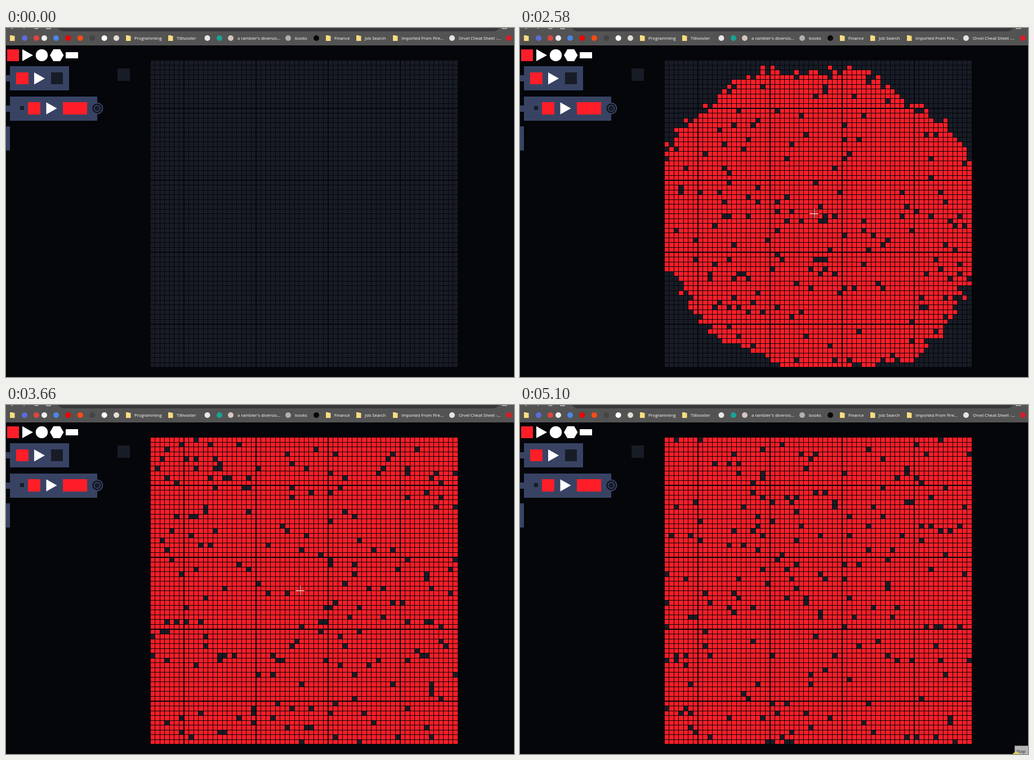
Write an HTML page with a canvas that moves like this. It is 902 px wide and 621 px high and loops after 5150 ms.

```html
<!DOCTYPE html>
<html lang="en">
<head>
<meta charset="utf-8">
<title>Growing colony</title>
<style>
html, body { margin: 0; width: 100%; height: 100%; overflow: hidden; background: #04060a; }
canvas, svg { position: absolute; left: 0; top: 0; }
text { font: 7.65px "Open Sans", "Noto Sans", sans-serif; fill: #fff; }
</style>
</head>
<body>
<canvas id="stage" width="902" height="621"></canvas>
<svg width="902" height="621" viewBox="0 0 902 621">
  <defs>
    <path id="folder" d="M0 0h4.5l1 1h3v9h-8.5z" fill="#f9dc82"/>
    <path id="play" d="M0 0L19 10.7L0 21.4z" fill="#fff"/>
  </defs>
  <rect width="902" height="31" fill="#535353"/>
  <rect x="91" y="-20" width="786" height="26" rx="12" fill="#37383a"/>
  <path d="M9 0l3 1.5M31 0l2 1M50 0q4 3 8 0M72 0v1.5h7V0M881 0v1h8V0" fill="none" stroke="#eee"/>
  <g id="bookmarks"></g>

  <g shape-rendering="crispEdges">
    <path d="M7 68h105v43H7zM0 84h7v11H0zM7 122h155v43H7zM0 138h7v11H0zM0 175h7v43H0z" fill="#384364"/>
    <path d="M2 38h21v21H2zM18 79h22v21H18zM39 132h22v22H39zM101 132h43v22h-43z" fill="#ff1e28"/>
    <path d="M80 79h21v21H80zM25 139h7v7h-7zM198 72h22v22h-22z" fill="#181c26"/>
    <path d="M106 43h22v11h-22z" fill="#fff"/>
  </g>
  <use href="#play" x="29" y="37.7"/>
  <use href="#play" x="50" y="79"/>
  <use href="#play" x="71.5" y="132.3"/>
  <circle cx="63.5" cy="48.4" r="10.7" fill="#fff"/>
  <path d="M78 48.4l6.2-10.7h12l6.2 10.7l-6.2 10.7h-12z" fill="#fff"/>
  <circle cx="161.8" cy="143" r="10.6" fill="#384364"/>
  <circle cx="161.8" cy="143" r="7.4" fill="#384364" stroke="#0a0d15" stroke-width="2"/>
  <circle cx="161.8" cy="143" r="4.5" fill="#181c26"/>

  <g id="stop" visibility="hidden">
    <rect x="878.5" y="606.5" width="30" height="20" fill="#b4b4b4" stroke="#777"/>
    <text x="881.5" y="619" style="fill:#222">Stop</text>
    <circle cx="881" cy="624.5" r="7" fill="#e8d24c"/>
  </g>
</svg>
<script>
const LOOP = 5150, TICK = 47.5, SIZE = 64;
const LEFT = 256.83, TOP = 58.2, SCALE = 16 / 15, PITCH = 8 * SCALE, CELL = 7 * SCALE;
const RED = '#ff1e28', DARK = '#181c26';
const ctx = document.getElementById('stage').getContext('2d');
const stop = document.getElementById('stop');

// Bookmarks: text position, label, icon colour (a folder if there is none)
const bookmarks = [
  [22, ''], [45, '', '#5b6be0'], [66, '', '#e0453a'], [80, '', '#f0f0f0'],
  ...['#4a86e8', '#f00000', '#ff4a16', '#444', '#fff', '#e4dcd6'].map((c, i) => [101 + i * 21.4, '', c]),
  [228, 'Programming'], [303, 'Tillivoxter'], [369.5, '', '#e8e8e8'], [391, '', '#18a394'],
  [411, "a rambler's diversio...", '#d8c4c0'], [513, 'books', '#b0b0b0'], [563, '', '#080808'],
  [583, 'Finance'], [637, 'Job Search'], [702, 'Imported From Fire...'],
  [804, 'Orvel Cheat Sheet -...', '#e4e4e4'], [905, '', '#d81c28']
];
document.getElementById('bookmarks').innerHTML = bookmarks.map(([x, label, colour]) =>
  (colour ? `<circle cx="${x - 12}" cy="18" r="5" fill="${colour}"/>` : `<use href="#folder" x="${x - 15}" y="13"/>`) +
  `<text x="${x}" y="20.8">${label}</text>`).join('');

function hash(a, b, c) {
  let h = Math.imul(a + 11, 374761393) ^ Math.imul(b + 7, 668265263) ^ Math.imul(c + 3, 1274126177);
  h = Math.imul(h ^ h >>> 15, 2246822519);
  h = Math.imul(h ^ h >>> 13, 3266489917);
  return ((h ^ h >>> 16) >>> 0) / 4294967296;
}

// The colony spreads from the middle, slowly at first, with a lopsided, ragged rim.
function birth(col, row) {
  const dx = col - 29, dy = row - 32, angle = Math.atan2(dy, dx);
  const rim = 32.8 + 2.8 * Math.cos(angle - .3) + 1.8 * Math.cos(2 * angle - .7) + .8 * Math.sin(9 * angle);
  const reach = Math.hypot(dx, dy) / rim + (hash(col, row, 0) - .5) * .07;
  return reach < .15 ? 1890 + 310 * Math.max(0, reach) / .15 : 2200 + (reach - .15) * 447;
}

function span(origin, i) {
  const from = Math.round(origin + i * PITCH);
  return [from, Math.round(origin + i * PITCH + CELL) - from];
}

const cells = Array.from({ length: SIZE * SIZE }, (_, i) => {
  const col = i % SIZE, row = Math.floor(i / SIZE);
  const [x, w] = span(LEFT, col), [y, h] = span(TOP, row);
  return { col, row, x, y, w, h, born: birth(col, row) };
});

// Pointer moves: start, end, and where it goes
const moves = [
  [160, 620, 367, 163], [750, 1000, 586, 250], [1000, 1260, 512, 323], [1310, 1460, 526, 338],
  [1640, 1740, 522, 330], [3720, 4040, 867, 505], [4040, 4140, 874, 515], [4140, 4500, 890, 630]
];
const arrow = new Path2D('M0 0V10.5L2.5 8.3L4 12L5.7 11.3L4.2 7.8H7.5Z');

function pointerAt(t) {
  let x = 863, y = 630;
  for (const [from, to, tx, ty] of moves) {
    const k = Math.min(1, Math.max(0, (t - from) / (to - from)));
    const ease = (1 - Math.cos(Math.PI * k)) / 2;
    x += (tx - x) * ease;
    y += (ty - y) * ease;
  }
  return [Math.round(x), Math.round(y)];
}

function drawPointer(t) {
  const [x, y] = pointerAt(t);
  const overGrid = x > 257 && x < 802 && y > 58 && y < 603;
  ctx.save();
  ctx.translate(x, y);
  ctx.fillStyle = '#fff';
  if (overGrid) {
    ctx.globalCompositeOperation = 'difference';
    ctx.fillRect(-8, 0, 16, 1);
    ctx.fillRect(0, -8, 1, 8);
    ctx.fillRect(0, 1, 1, 7);
  } else {
    ctx.fill(arrow);
  }
  ctx.restore();
}

function draw(time) {
  const tick = Math.floor((time - 2200) / TICK + 1e-6), t = 2200 + tick * TICK;
  ctx.fillStyle = '#04060a';
  ctx.fillRect(0, 0, 902, 621);
  for (const c of cells) {
    const alive = t >= c.born && hash(c.col, c.row, tick + 100) > .05;
    ctx.fillStyle = alive ? RED : DARK;
    ctx.fillRect(c.x, c.y, c.w, c.h);
  }
  drawPointer(t);
  stop.setAttribute('visibility', time >= 5050 ? 'visible' : 'hidden');
}

const start = performance.now();
function loop() {
  draw((performance.now() - start) % LOOP);
  requestAnimationFrame(loop);
}
loop();
</script>
</body>
</html>
```
